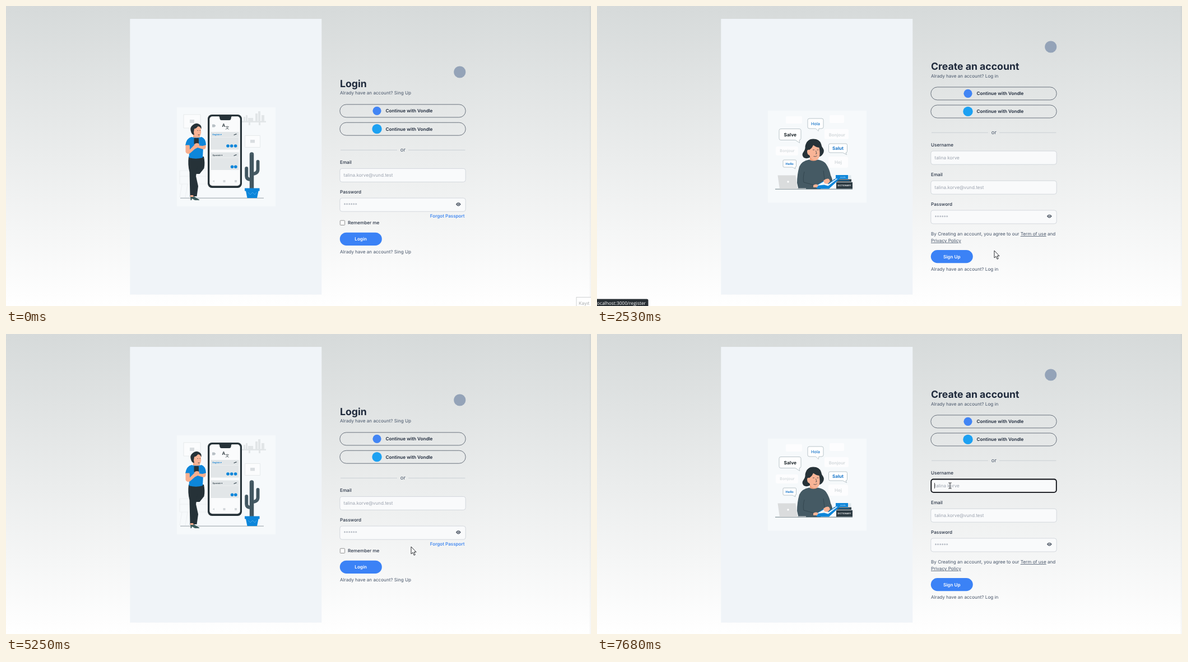
These frames come from a looping animation (1044 by 536 pixels, 8 s). An HTML page:

```html
<!DOCTYPE html>
<html lang="en">
<head>
<meta charset="utf-8">
<title>Sign in</title>
<style>
  html, body { margin: 0; width: 100%; height: 100%; overflow: hidden; background: #fff; }
  svg { display: block; width: 1044px; height: 536px; }
  text { font: 400 8.15px Inter, sans-serif; fill: #475569; text-rendering: geometricPrecision; white-space: pre; }
  .title { font-size: 17.65px; font-weight: 700; fill: #1e293b; }
  .label { font-weight: 500; fill: #273244; }
  .strong { font-weight: 600; fill: #1e293b; }
  .hint { fill: #9ca3af; }
  .link { font-weight: 500; fill: #2f7df0; }
  .or { font-size: 9.3px; }
  .mid { text-anchor: middle; }
  .white { fill: #fff; }
  .u { text-decoration: underline; }
  .say text { text-anchor: middle; font-weight: 700; font-size: 8px; }
  .say .blue { fill: #1976c9; }
  .say .pale { fill: #d6dbde; }
  .tiny { font-size: 3.8px; font-weight: 600; }
  #status text { font: 500 8.4px "Open Sans", "Noto Sans", sans-serif; fill: #fff; text-anchor: end; }
</style>
</head>
<body>
<svg viewBox="0 0 1044 536">
  <defs>
    <linearGradient id="sky" x2="0" y2="1">
      <stop stop-color="#d6dada"/><stop offset="1" stop-color="#fff"/>
    </linearGradient>
    <linearGradient id="edge">
      <stop stop-color="#000" stop-opacity="0"/><stop offset="1" stop-color="#000" stop-opacity=".04"/>
    </linearGradient>
  </defs>
  <rect width="1044" height="536" fill="url(#sky)"/>
  <rect x="1040" width="4" height="536" fill="url(#edge)"/>
  <rect x="221.3" y="23" width="342" height="492.6" fill="#f0f4f8"/>

  <g id="login">
    <rect x="305" y="181" width="176" height="177" fill="#fff" opacity=".38"/>
    <!-- room -->
    <g fill="#fbfcfd" stroke="#e3e6e8" stroke-width=".8">
      <path d="M317 194h30v24h-30zM426.500 231.500h27v21h-27z"/>
      <path d="M310 294h50v24h-50zM314 318l-4 24M324 318l-4 24M310 304h50" fill="none" stroke="#eaedef"/>
    </g>
    <path d="M328 203h8v6h-8zM436 239h8v5.500h-8z" fill="#d9dde0"/>
    <path d="M421 205.500h43v2.600h-43zM433 208h3v5h-3zM451 208h3v5h-3zM424 198h3v8h-3zM428 195h3v11h-3zM432 200h9v6h-9zM445 192h4v14h-4zM450 188h4v18h-4zM456 195h5v11h-5z" fill="#e2e6e8"/>
    <path d="M311 343.200H460" stroke="#56646c" stroke-width=".6"/>
    <!-- phone -->
    <rect x="360" y="194" width="61" height="131" rx="7.500" fill="#263238"/>
    <rect x="363.300" y="197.200" width="54.500" height="124" rx="5" fill="#fafbfc"/>
    <path d="M380 197h23q-1 0-1.500 4.500-.500 2.500-3 2.500h-14q-2.500 0-3-2.500-.500-4.500-1.500-4.500z" fill="#263238"/>
    <path d="M368 211.500h4l2.500 2.500-2.500 2.500h-4z" fill="#b8c0c5"/>
    <text x="385.600" y="216" style="font-size:8px;font-weight:600;fill:#263238">A</text>
    <text x="391.300" y="219.600" style="font:500 7px 'Noto Sans CJK SC',sans-serif;fill:#263238">文</text>
    <g fill="#e2e6e8"><rect x="365.500" y="225" width="50" height="31.500"/><rect x="365.500" y="261.500" width="50" height="31.500"/></g>
    <path d="M365.500 234.500h50M365.500 271h50" stroke="#f3f5f6" stroke-width=".6"/>
    <text x="368.500" y="230.700" class="tiny" style="fill:#0b7fd4">English ▾</text>
    <text x="368.500" y="268" class="tiny" style="fill:#37474f">Spanish ▾</text>
    <path d="M406.500 230.500l5-1.800M406.500 267.500l5-1.800" stroke="#37474f" stroke-width="1.300"/>
    <g fill="#0d86da"><circle cx="396" cy="250" r="2.800"/><circle cx="402.700" cy="250" r="2.800"/><circle cx="409.600" cy="250" r="2.800"/><circle cx="403.600" cy="287.300" r="2.800"/><circle cx="409.800" cy="287.300" r="2.800"/></g>
    <path d="M368.500 313l3.500-2v4zM387.500 311h4v4h-4zM408 311h4v4h-4z" fill="#d3d8db"/>
    <!-- cactus -->
    <g stroke="#455a64" stroke-width="7.500" stroke-linecap="round" fill="none">
      <path d="M438.500 265V326"/>
      <path d="M429.200 290v14q0 6 8 6M449.500 278v14q0 7-9 8" stroke-width="6"/>
    </g>
    <path d="M437 266v58M440.300 266v58M429 290v14M449.500 278v14" stroke="#32454e" stroke-width=".6"/>
    <path d="M426 325.500h26.500v5H426zM428 330.500h22.500l-2.500 12.500h-17.500z" fill="#0d86da"/>
    <path d="M432 333l4 4 4-4 4 4 3-4" stroke="#5fb4ee" stroke-width=".7" fill="none"/>
    <!-- reader -->
    <path d="M326 269q-2 14 1.500 28l1 44h7.500l3-41 1.500 0 5 0 8-10q2-10-.500-21z" fill="#263238"/>
    <path d="M342 286l-3 18 4 18-2.500 18h-6l-1-30z" fill="#263238"/>
    <path d="M329 340l6 0 10 6v1h-8l-5-3-1 3h-1.500z" fill="#3d5c5c"/>
    <path d="M329 338h5l1 3h-6z" fill="#f7ae8e"/>
    <path d="M334 225h12l0 12h-12z" fill="#f7a986"/>
    <path d="M331 234q9 2.500 18 0 7 2 8 14l-5 4-1 19q-12 3.500-24.500 0l1-21-7.500-1q2-13 11-15z" fill="#0d86da"/>
    <path d="M320.500 248.500h7l.5 8 8-8 9-1 0 4-8 4-9 8q-6 1.500-7.500-3zM350.500 250l6-1.500q1 8-4.500 7.500l-10-3 1-4z" fill="#f7ae8e"/>
    <rect x="335.500" y="236" width="8.500" height="11" rx="1" fill="#263238"/>
    <path d="M336 247q4-3.500 9-.500l-1 5h-7z" fill="#f7ae8e"/>
    <path d="M332 216q8-6 15.500 0l.7 10q-1 8-6.500 8-8-1-9.700-9z" fill="#f9b496"/>
    <path d="M330 224q-2.500-7 3.500-11.500 6-5 12.500-.500 3.500 2.500 2.500 8-2-5-6-5-3 4-6.500 4.500l-1 6 1 5q-5-1-6-6.500z" fill="#263238"/>
    <path d="M341.500 222.500h1.500M345.500 222.500h1.500M342.500 230q2 .8 3 0" stroke="#263238" stroke-width=".7"/>
  </g>

  <g id="register">
    <rect x="305" y="187" width="176" height="164.500" fill="#fff" opacity=".38"/>
    <g fill="#fff" opacity=".8">
      <rect x="337" y="197" width="29" height="13" rx="2"/><rect x="415" y="195" width="26" height="14" rx="2"/>
      <rect x="406" y="220" width="43" height="18" rx="3"/><rect x="319" y="251" width="40" height="16" rx="3"/>
      <rect x="413" y="269" width="35" height="20" rx="3"/>
    </g>
    <g fill="#fff" stroke="#a9b6bd" stroke-width=".8" stroke-linejoin="round">
      <path d="M379 201h22q3 0 3 3v12q0 3-3 3h-5l-1 4.500-4.500-4.500H379q-3 0-3-3v-12q0-3 3-3z"/>
      <path d="M328 219.500h33q3 0 3 3v14q0 3-3 3l.500 5-7.500-5h-26q-3 0-3-3v-14q0-3 3-3z"/>
      <path d="M416 246h28q2.500 0 2.500 2.500v11q0 2.500-2.500 2.500l1.500 3.500-7-3.500H416q-2.500 0-2.500-2.500v-11q0-2.500 2.500-2.500z"/>
      <path d="M334 275h19.500q2 0 2 2v9q0 2-2 2l.5 3-5-3H334q-2 0-2-2v-9q0-2 2-2z"/>
    </g>
    <g class="say">
      <text x="390" y="212.700" class="blue" style="font-size:7.400px;font-weight:500">Hola</text>
      <text x="344.800" y="232.500" style="fill:#1d262b;font-size:8.300px">Salve</text>
      <text x="428.300" y="233" class="pale" style="font-size:7.700px">Bonjour</text>
      <text x="430" y="256.500" class="blue">Salut</text>
      <text x="339.500" y="261" class="pale" style="font-size:7px;font-weight:600">Bonjour</text>
      <text x="343.700" y="283.500" class="blue" style="font-size:5.700px">Hello</text>
      <text x="430.500" y="282.200" class="pale">Hej</text>
    </g>
    <!-- student -->
    <path d="M369 271q-5-5 0-11 3-4 2.500-9 2.500-13.500 14.500-13.500 11 0 14 9 .5 4 3.500 8 3 5-.5 10-3 5-9 5-8 3-14 1-6 3-11 .5z" fill="#263238"/>
    <path d="M380.500 264h11.500l.8 13q-6 4-13.300 0z" fill="#ef9f7c"/>
    <path d="M375 260q0-4 4-3 5-3 7-8.500 5 4 10.500 4.500 2 9 .5 15.500-2 7-8.500 7-6.500-1-9.500-9-4-1-4-6.500z" fill="#f9b496"/>
    <path d="M385 257h3M392.500 257h3M390.500 258.500l1.500 5.500-2 .3M386.500 268.500q3.500 1.500 6-.8" stroke="#263238" stroke-width=".7" fill="none"/>
    <path d="M378.500 274.500q7.500 4.500 15.500 0 11 2 15 8 6 9 8 20 4 8 4 15l-13 2-5-5-4 12.500H359.500l-2.500-11q0-15 4-29 4-10 17.500-12.500z" fill="#455a64"/>
    <path d="M370 296q-3 12-1 19l19 5M404 294l2 16" stroke="#2f424b" stroke-width=".8" fill="none"/>
    <path d="M318 327.200H456" stroke="#455a64" stroke-width=".8"/>
    <path d="M322.500 302.500h32l3.500 24.500h-32z" fill="#dadcdd"/>
    <path d="M358 325.500h15v1.500h-15z" fill="#b9bfc2"/>
    <circle cx="341" cy="314" r="1.700" fill="#fff"/>
    <path d="M426 302h22v7h-22z" fill="#0d86da"/><path d="M448 302.500h5.500v6H448z" fill="#dfe6ea"/>
    <path d="M422 309.500h32v4.500h-32z" fill="#37474f"/><path d="M424 311.500h26" stroke="#0d86da" stroke-width=".8"/>
    <path d="M427 314.800h29v11.700h-29z" fill="#2d3b43"/>
    <text x="441.500" y="322.300" class="mid" style="font-size:3.800px;font-weight:600;fill:#fff">DICTIONARY</text>
    <text x="434" y="307" style="font-size:3.400px;fill:#d8ecfa">words</text>
    <path d="M389 322l16-10 8 5 16-11 4 3-19 17.500H393z" fill="#0d86da"/>
    <path d="M392 321l13-7.500 8 5 15-10.500 1 1-16.500 12.500-7-2z" fill="#f4f8fb"/>
    <path d="M404 312q5-5 10-3l2 4-4 5-6-1zM386 320q5-3 9 0l-2 4h-7z" fill="#f9b496"/>
    <g id="focus">
      <rect x="596.300" y="259.500" width="223.500" height="23.300" rx="4" fill="none" stroke="#0b0d12" stroke-width="1.800"/>
      <path d="M602.500 266v10" stroke="#111" stroke-width=".8"/>
    </g>
  </g>

  <g id="tip">
    <rect x="1018" y="520.300" width="40" height="30" fill="#fff" stroke="#c4c7c8" stroke-width=".8"/>
    <text x="1022" y="533.800" style="fill:#a9acad">Kayıt</text>
  </g>
  <g id="status">
    <rect x="-5" y="523.500" height="20" rx="2.500" fill="#282f34"/>
    <text y="534.300"></text>
  </g>
  <g id="cursor" fill="#fff" stroke="#15181c" stroke-width=".9" stroke-linejoin="round">
    <path id="arrow" d="M0 0V13L3 10.300 5.200 15.300 7.200 14.400 5.100 9.600H9Z"/>
    <path id="hand" d="M-1.400 8.500V.8Q-1.400-.6 0-.6T1.400 .8V5.500Q3.600 4.700 3.900 6.300 5.500 5.600 5.800 7 7 6.600 7 8.200V11.500Q7 13.500 5.500 15.800H-.5Q-1 14-2.200 12.800L-4.500 9.600Q-4.600 7.400-2.800 7.700Z"/>
    <path id="beam" d="M-2.700-5H-.8Q0-5 0-4 0-5 .8-5H2.700M0-4V4M-2.700 5H-.8Q0 5 0 4 0 5 .8 5H2.700" fill="none"/>
  </g>
</svg>
<script>
const $ = id => document.getElementById(id);
const brand = 'Vondle', user = 'talina korve', mail = 'talina.korve@vund.test';

const text = (x, y, s, cls = '') => `<text x="${x}" y="${y}" class="${cls}">${s}</text>`;
const box = (y, w, h, r, style) => `<rect x="595.8" y="${y}" width="${w}" height="${h}" rx="${r}" ${style}/>`;
const social = (y, r, color) =>
  box(y, 224.4, 23, 11.5, 'fill="none" stroke="#4b5563" stroke-width=".8"') +
  `<circle cx="662" cy="${y + 11.4}" r="${r}" fill="${color}"/>` +
  text(677.5, y + 14.4, 'Continue with ' + brand, 'strong');
const field = (y, name, hint) =>
  text(596, y - 8.2, name, 'label') +
  box(y, 224.4, 24, 4, 'fill="#f9fafb" stroke="#cbd0d6" stroke-width=".8"') +
  text(602.5, y + 14.9, hint, 'hint');
const eye = y =>
  `<path d="M802.800 ${y}q4.500-6.400 9 0-4.500 6.400-9 0z" fill="#4b5563"/>` +
  `<circle cx="807.300" cy="${y}" r="2" fill="#f9fafb"/><circle cx="807.300" cy="${y}" r="1.200" fill="#4b5563"/>`;
const divider = y =>
  `<path d="M597 ${y}H698M718 ${y}H819.500" stroke="#c3cad1" stroke-width=".8"/>` +
  text(708.4, y + 2.8, 'or', 'or mid');
const submit = (y, s) => box(y, 75, 23.2, 11.6, 'fill="#3b82f6"') + text(633.2, y + 14.5, s, 'strong white mid');
const head = (y, title, note) => text(596, y, title, 'title') + text(596, y + 13.3, note);
const avatar = y => `<circle cx="809.800" cy="${y}" r="10.600" fill="#94a3b8"/>`;

const toRegister = 'Alrady have an account? Sing Up', toLogin = 'Alrady have an account? Log in';
const add = (id, parts) => $(id).insertAdjacentHTML('afterbegin', parts.join(''));
add('login', [
  avatar(118), head(145, 'Login', toRegister),
  social(175.9, 7.6, '#4285f4'), social(208.2, 8.7, '#1da1f2'), divider(257.4),
  field(290.4, 'Email', mail), field(343.1, 'Password', '******'), eye(354.3),
  text(756.8, 377.5, 'Forgot Passport', 'link'),
  '<rect x="596.300" y="383.200" width="8.300" height="8.300" rx="1" fill="#fff" stroke="#767676" stroke-width=".8"/>',
  text(610, 390.2, 'Remember me', 'label'),
  submit(404.7, 'Login'), text(596, 441.9, toRegister)
]);
add('register', [
  avatar(73), head(114.2, 'Create an account', toLogin),
  social(144.9, 7.6, '#4285f4'), social(177, 8.7, '#1da1f2'), divider(226.2),
  field(259.1, 'Username', user), field(312.2, 'Email', mail), field(365, 'Password', '******'), eye(375.6),
  text(596, 410, 'By Creating an account, you agree to our <tspan class="u">Term of use</tspan> and'),
  text(596, 421.8, 'Privacy Policy', 'u'),
  submit(436, 'Sign Up'), text(596, 472.5, toLogin)
]);

// Cursor runs: first step, last step, step count, way points x, y
const runs = [
  [410, 1120, 8, [901,506, 862,482, 802,456, 745,440, 695,429]],
  [1220, 2020, 9, [690,375, 676,290, 664,225, 656,187, 662,222, 640,300, 607,386, 690,392, 773,382]],
  [2120, 2730, 7, [738,412, 712,434, 709,437, 709,437]],
  [3040, 3320, 4, [714,440, 714,440, 711,452, 708,464]],
  [3460, 3460, 1, [708,465]],
  [4250, 5050, 9, [712,458, 730,430, 745,400, 752,383]],
  [5250, 5950, 8, [723,380, 690,374, 667,384, 668,400, 688,408, 700,412]],
  [6070, 6780, 8, [704,425, 706,437, 706,437, 706,437, 705,430, 699,400, 691,359, 664,318]],
  [6880, 7380, 6, [655,300, 645,288, 636,277, 632,273, 630,271, 630,271]]
];
// Hover zones: shape, left, top, right, bottom
const zones = {
  login: [
    ['hand', 596, 176, 820, 199], ['hand', 596, 208, 820, 231], ['hand', 596, 405, 671, 428],
    ['hand', 693, 434, 723, 445], ['beam', 596, 275, 820, 314], ['beam', 596, 328, 820, 367]
  ],
  register: [
    ['hand', 596, 145, 820, 168], ['hand', 596, 177, 820, 200], ['hand', 596, 436, 671, 459],
    ['hand', 693, 464.5, 716, 475], ['beam', 596, 244, 820, 283], ['beam', 596, 297, 820, 336],
    ['beam', 596, 350, 820, 389]
  ]
};
const views = [[0, 'login'], [2520, 'register'], [3950, 'login'], [6470, 'register']];
const hints = [[0, ''], [2320, 'register'], [3040, ''], [3670, 'login'], [4250, ''], [6270, 'register'], [6880, '']];
const latest = (list, t) => list.findLast(e => e[0] <= t);

function place(t) {
  const run = latest(runs, t);
  if (!run) return null;
  const [from, to, count, pts] = run;
  const last = pts.length / 2 - 1;
  if (!last) return pts;
  const step = Math.min(count - 1, Math.floor((t - from + 1) / (to - from) * (count - 1)));
  const at = step / (count - 1) * last;
  const i = Math.min(last - 1, Math.floor(at)), f = at - i;
  return [0, 1].map(k => Math.round(pts[2 * i + k] * (1 - f) + pts[2 * i + 2 + k] * f));
}

const show = (id, on) => { $(id).style.display = on ? '' : 'none'; };

function draw(t) {
  const view = latest(views, t)[1], hint = latest(hints, t)[1], pos = place(t);
  show('login', view === 'login');
  show('register', view === 'register');
  show('focus', t >= 7600);
  show('tip', t < 100);
  show('status', hint);
  if (hint) {
    const w = hint === 'login' ? 82 : 91.5, [plate, label] = $('status').children;
    plate.setAttribute('width', w + 5);
    label.setAttribute('x', w - 4.5);
    label.textContent = 'localhost:3000/' + hint;
  }
  show('cursor', pos);
  // After the page switch the link has moved away, so the arrow returns
  if (pos) {
    const [x, y] = pos;
    const zone = zones[view].find(([, l, top, r, b]) => x >= l && x <= r && y >= top && y <= b);
    const shape = zone ? zone[0] : 'arrow';
    for (const id of ['arrow', 'hand', 'beam']) show(id, id === shape);
    $('cursor').setAttribute('transform', `translate(${x} ${y})`);
  }
}

const start = performance.now();
function tick() {
  draw((performance.now() - start) % 8000);
  requestAnimationFrame(tick);
}
tick();
</script>
</body>
</html>
```
